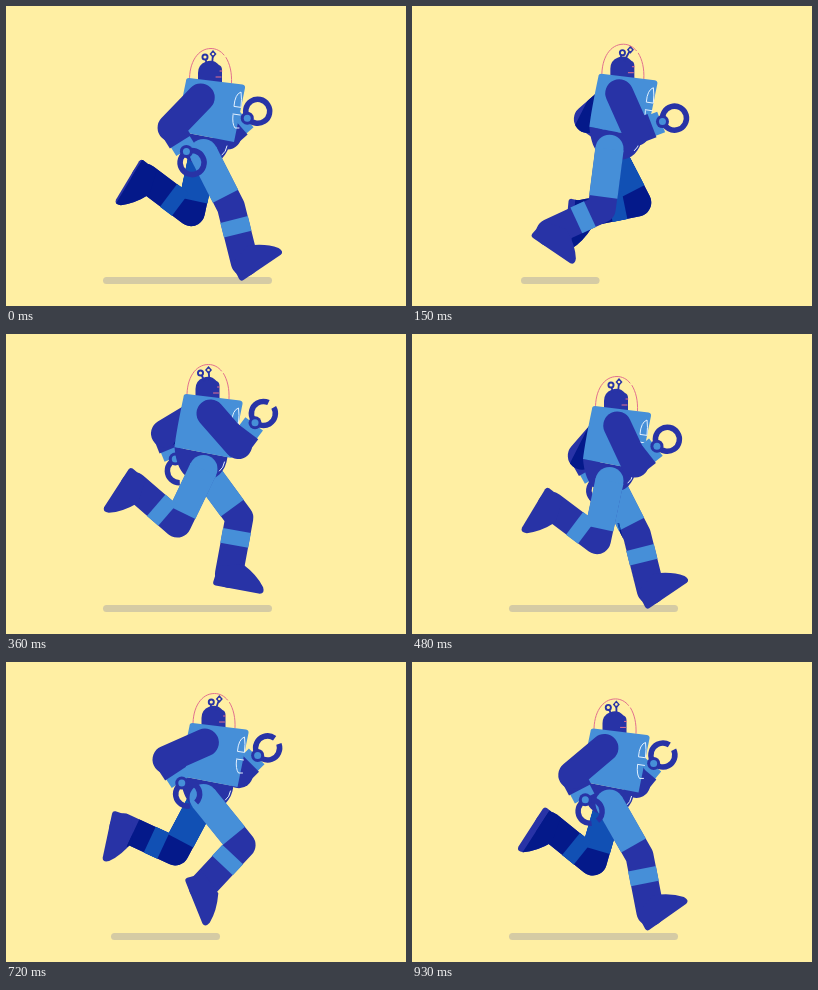
Animation, 400 px wide and 300 px high, one loop 0.96 s. Source, as an HTML page with a canvas:

```html
<!DOCTYPE html>
<html lang="en">
<head>
<meta charset="utf-8">
<title>Running robot</title>
<style>
html, body { margin: 0; width: 100%; height: 100%; overflow: hidden; background: #ffefa3; }
canvas { display: block; }
</style>
</head>
<body>
<canvas id="stage" width="400" height="300"></canvas>
<script>
const ctx = document.getElementById('stage').getContext('2d');
const LOOP = 960, HALF = LOOP / 2, STEP = 30;
const SKY = '#ffefa3', PINK = '#e2718f', WHITE = '#e4f1ff';
const LIT = { light: '#468fd8', dark: '#2833a6' };
const SHADED = { light: '#1150b4', dark: '#04198a' };
const THIGH = 60.5, SHANK = 57, UPPER_ARM = 42, FOREARM = 28;

// Joint angles in degrees, as [time, angle]; 0 points right and 90 down
const SWING = {
  thigh: [[0, 63], [100, 83], [240, 118], [480, 102], [600, 69], [720, 51]],
  shank: [[0, 76], [90, 116], [240, 205], [480, 217], [600, 180], [720, 133], [930, 79]],
  foot: [[0, -34], [90, 0], [120, 10], [240, 102], [480, 121], [720, 68], [930, -35]],
  upperArm: [[0, 134], [105, 81], [240, 49], [480, 65], [600, 132], [720, 156]],
  forearm: [[0, 58], [105, -4], [240, -42], [450, -47], [600, 21], [720, 57]]
};

const { sin, cos, PI } = Math;
const rad = deg => deg * PI / 180;
const clamp = (v, lo, hi) => Math.min(hi, Math.max(lo, v));
const polar = ([x, y], deg, r) => [x + r * cos(rad(deg)), y + r * sin(rad(deg))];
const mix = (a, b, k) => [a[0] + (b[0] - a[0]) * k, a[1] + (b[1] - a[1]) * k];

// Smooth periodic curve through a joint's keys
function angleOf(joint, time) {
  const keys = SWING[joint], n = keys.length, t = time % LOOP;
  const at = i => {
    const turn = Math.floor(i / n), [when, value] = keys[i - turn * n];
    return [when + turn * LOOP, value];
  };
  const i = keys.findLastIndex(key => key[0] <= t);
  const [a, b, c, d] = [at(i - 1), at(i), at(i + 1), at(i + 2)];
  const span = c[0] - b[0], u = (t - b[0]) / span, rise = c[1] - b[1];
  const m0 = (c[1] - a[1]) / (c[0] - a[0]) * span;
  const m1 = (d[1] - b[1]) / (d[0] - b[0]) * span;
  return b[1] + u * (m0 + u * (3 * rise - 2 * m0 - m1 + u * (m0 + m1 - 2 * rise)));
}

// Everything that repeats with each single step
function bodyPose(time) {
  const p = time / HALF * 2 * PI, c = cos(p), s = sin(p);
  return {
    dx: 1.75 - 1.75 * c + 4.25 * s,
    dy: -5.5 + 5.5 * c + 6.5 * s + 3.8 * sin(2 * p),
    left: Math.max(97, 101 - 4 * c + 7 * s),
    right: Math.min(266, 240 + 26 * c - 46 * s),
    opening: clamp(1.5 * cos(p - rad(258)), 0, 0.3)
  };
}

function line(points, color, width, cap = 'butt') {
  ctx.beginPath();
  points.forEach(p => ctx.lineTo(...p));
  ctx.lineCap = cap;
  ctx.lineJoin = 'round';
  ctx.strokeStyle = color;
  ctx.lineWidth = width;
  ctx.stroke();
}

function disc([x, y], r, color) {
  ctx.beginPath();
  ctx.arc(x, y, r, 0, 7);
  ctx.fillStyle = color;
  ctx.fill();
}

function fill(path, color) {
  ctx.fillStyle = color;
  ctx.fill(new Path2D(path));
}

function outline(path, color) {
  ctx.strokeStyle = color;
  ctx.lineWidth = 1;
  ctx.lineCap = 'round';
  ctx.stroke(new Path2D(path));
}

function legPose(time) {
  const [thigh, shank, foot] = ['thigh', 'shank', 'foot'].map(joint => angleOf(joint, time));
  const hip = [197.5, 147 + bodyPose(time).dy];
  const knee = polar(hip, thigh, THIGH);
  return { thigh, shank, foot, hip, knee, ankle: polar(knee, shank, SHANK) };
}

function drawLeg({ thigh, shank, foot, hip, knee, ankle }, { light, dark }) {
  line([hip, knee, ankle], dark, 28, 'round');
  disc(hip, 14, light);
  line([hip, polar(hip, thigh, THIGH - 12)], light, 28.4);
  line([polar(knee, shank, 13), polar(knee, shank, 28)], light, 28.4);
  ctx.save();
  ctx.translate(...ankle);
  ctx.rotate(rad(foot));
  fill('M-12-6L-14 11Q-14 14-11 14H34Q39 13 36 7Q28-4 12-12Z', dark);
  ctx.restore();
}

function drawFarLeg(time) {
  const pose = legPose(time + HALF);
  const wave = peak => cos((time - peak) / LOOP * 2 * PI);
  const legShade = 32 * clamp(1 + 1.1 * wave(880), 0, 1);
  const footShade = 32 * clamp(1.6 * wave(60) - 0.6, 0, 1);
  const region = new Path2D();
  const addStrip = ([x, y], deg, length, top, height) => {
    const strip = new Path2D();
    strip.rect(-16, top, length, height);
    region.addPath(strip, new DOMMatrix().translate(x, y).rotate(deg));
  };
  addStrip(pose.hip, pose.thigh, 76, 16 - legShade, legShade);
  addStrip(pose.knee, pose.shank, 62, 16 - legShade, legShade);
  addStrip(pose.ankle, pose.foot, 56, -16, footShade);
  drawLeg(pose, LIT);
  ctx.save();
  ctx.clip(region);
  drawLeg(pose, SHADED);
  ctx.restore();
}

function drawArm(time, far) {
  const { dy, dx, opening } = bodyPose(time);
  const { light, dark } = LIT;
  const bend = angleOf('forearm', time);
  const shoulder = [200 + dx + 7 * cos((time - 370) / LOOP * 2 * PI), 91.5 + dy];
  const elbow = polar(shoulder, angleOf('upperArm', time), UPPER_ARM);
  const wrist = polar(elbow, bend, FOREARM);
  if (far) [shoulder, elbow, wrist].forEach(p => p[0] = 208 + (p[0] - 208) * 0.9);

  line([elbow, mix(elbow, wrist, 0.95)], light, 22);
  line([elbow, mix(elbow, wrist, 0.6)], dark, 25);
  line([shoulder, elbow], dark, 28, 'round');
  if (far) {
    ctx.save();
    ctx.clip(new Path2D('M188 70L155 135V160H200V70Z'));
    line([shoulder, elbow], SHADED.dark, 28, 'round');
    ctx.restore();
  }
  const claw = rad(bend + 5);
  ctx.beginPath();
  ctx.arc(...polar(wrist, bend + 5, 12.5), 12, claw + opening, claw + 2 * PI - opening);
  ctx.lineCap = 'butt';
  ctx.lineWidth = 5.5;
  ctx.strokeStyle = dark;
  ctx.stroke();
  disc(wrist, 6.5, dark);
  disc(wrist, 3.5, light);
}

function drawHead(sway) {
  const { dark } = LIT;
  fill('M192 78V67A12 12 0 0 1 213 59Q216 60 216 64V78Z', dark);
  outline('M210 71H215M214 65H216', PINK);
  const ring = [199 + sway, 51], [x, y] = [207 + sway, 48];
  line([[201, 59], ring], dark, 1.8);
  line([[206, 59], [x, y]], dark, 1.8);
  disc(ring, 3.5, dark);
  disc(ring, 1.6, SKY);
  fill(`M${x} ${y - 4}l3.500 4l-3.500 4l-3.500-4Z`, dark);
  disc([x, y], 1.3, SKY);
  outline('M183.500 75C183 56 192 42.500 205 42.500C210 42.500 215 45 218 49M220 51.500C224 58 226 67 225.500 77', PINK);
}

function drawTorso() {
  fill('M171 125L224 135C222 150 213 158 201 158C183 160 173 150 171 125Z', LIT.dark);
  outline('M216 149Q220 146 221 140', WHITE);
  fill('M183 72L236.500 78.500Q239.500 79 239 82L228 136L171 125Q173 108 180 75Q180 72 183 72Z', LIT.light);
  outline('M228 100Q229 88 235 86Q236 93 235 101ZM227 108L234 109M227 109Q226 118 229 122H233', WHITE);
}

function draw(time) {
  const { dx, dy, left, right } = bodyPose(time);
  ctx.fillStyle = SKY;
  ctx.fillRect(0, 0, 400, 300);
  line([[left + 3.5, 274.5], [right - 3.5, 274.5]], '#d5cba4', 7, 'round');

  drawArm(time + HALF, true);
  drawFarLeg(time);
  ctx.save();
  ctx.translate(dx, dy);
  drawHead(dx * 0.8);
  drawTorso();
  ctx.restore();
  drawLeg(legPose(time), LIT);
  drawArm(time, false);
}

function tick() {
  draw(Math.floor(performance.now() % LOOP / STEP) * STEP);
  requestAnimationFrame(tick);
}
tick();
</script>
</body>
</html>
```
